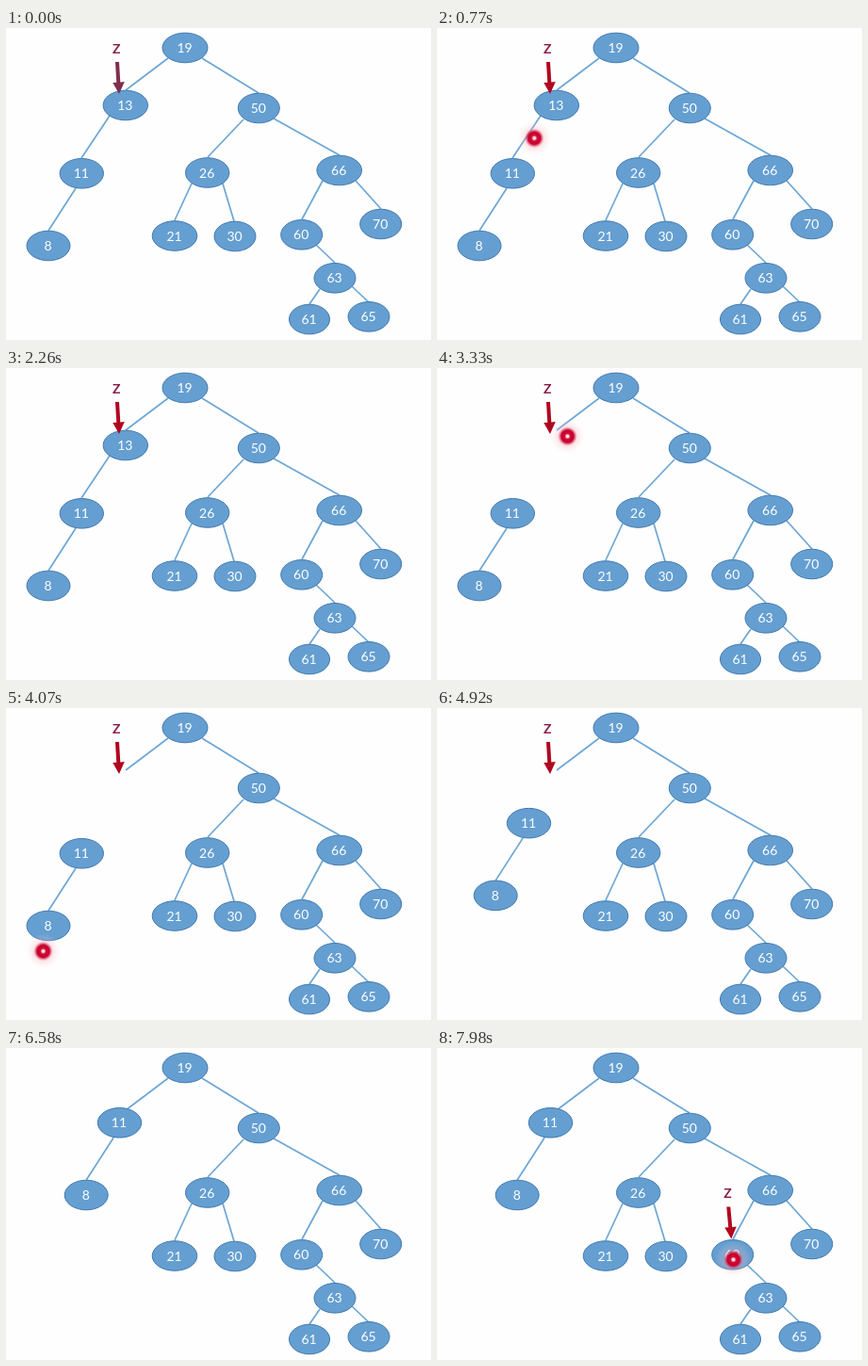
An HTML page that plays this animation: 451 px wide and 331 px high, repeating every 8 s.

```html
<!DOCTYPE html>
<html lang="en">
<head>
<meta charset="utf-8">
<title>Deleting from a binary search tree</title>
<style>
html, body { margin: 0; width: 100%; height: 100%; overflow: hidden; background: #fefefe; }
svg { display: block; width: 451px; height: 331px; }
ellipse { fill: #659fd1; stroke: #4179ae; stroke-width: 1; }
.edge { stroke: #6ca6d5; stroke-width: 1.7; }
.value { font: 14px Lato, Carlito, sans-serif; fill: #fff; text-anchor: middle; }
.letter { font: bold 14px Lato, Carlito, sans-serif; fill: #87204a; text-anchor: middle; }
</style>
</head>
<body>
<svg viewBox="0 0 451 331">
  <defs>
    <radialGradient id="glow">
      <stop offset="0" stop-color="#fff"/>
      <stop offset=".07" stop-color="#fbd5dd"/>
      <stop offset=".16" stop-color="#d60a35"/>
      <stop offset=".34" stop-color="#c4002b"/>
      <stop offset=".43" stop-color="#d83c5c" stop-opacity=".7"/>
      <stop offset=".54" stop-color="#f4a9b5" stop-opacity=".3"/>
      <stop offset="1" stop-color="#ffe4e4" stop-opacity="0"/>
    </radialGradient>
  </defs>
  <g id="tree"></g>
  <g id="removed"></g>
  <g id="subtree"></g>
  <g id="arrowA"></g>
  <g id="arrowB"></g>
  <circle id="laser" r="19" fill="url(#glow)"/>
</svg>
<script>
const LOOP = 8000;
const $ = id => document.getElementById(id);

function add(parent, tag, attrs, text) {
  const el = document.createElementNS("http://www.w3.org/2000/svg", tag);
  for (const k in attrs) el.setAttribute(k, attrs[k]);
  if (text !== undefined) el.textContent = text;
  parent.appendChild(el);
  return el;
}

function edge(g, x1, y1, x2, y2) {
  add(g, "line", { class: "edge", x1, y1, x2, y2 });
}

function node(g, value, cx, cy, rx = 22) {
  add(g, "ellipse", { cx, cy, rx, ry: 15.8 });
  add(g, "text", { class: "value", x: cx - 0.5, y: cy + 5 }, value);
}

// Labelled pointer; x, y is the top of the shaft, lean shifts the tip.
function pointer(g, x, y, lean) {
  add(g, "text", { class: "letter", x: x - 0.7, y: y - 9.5 }, "Z");
  const m = x + lean * 0.65;
  return add(g, "path", {
    d: `M${x - 2} ${y}h4L${m + 2} ${y + 21.5}l4.5 -.5L${x + lean} ${y + 34}L${m - 6} ${y + 22}l4 -.3Z`
  });
}

const tree = $("tree"), removed = $("removed"), subtree = $("subtree");

edge(tree, 172, 32, 127, 66);
edge(tree, 208, 32, 268, 69);
edge(tree, 252, 97, 214, 137);
edge(tree, 284, 96, 354, 135);
edge(tree, 197, 165, 179, 204);
edge(tree, 230, 165, 242, 205);
edge(tree, 336, 162, 314, 203);
edge(tree, 371, 162, 398, 192);
edge(tree, 329, 230, 349, 249);
edge(tree, 333, 277, 322, 293);
edge(tree, 367, 274, 385, 291);

node(tree, 19, 190, 21, 24);
node(tree, 50, 268.3, 85);
node(tree, 26, 213.7, 153.5, 23.2);
node(tree, 66, 353.7, 151, 23.8);
node(tree, 21, 179, 220.5, 23.8);
node(tree, 30, 243, 221);
node(tree, 60, 313.7, 219.3);
node(tree, 70, 397.7, 208);
node(tree, 63, 349, 265.3);
node(tree, 61, 322, 309, 21.5);
node(tree, 65, 385, 306.3);

edge(removed, 110, 93, 80, 138);
node(removed, 13, 126.8, 82, 23.7);

edge(subtree, 74, 170, 45, 215);
node(subtree, 11, 80.3, 154.3, 23.2);
node(subtree, 8, 45, 231, 23);

const shaftA = pointer($("arrowA"), 118, 36, 2);
pointer($("arrowB"), 309.3, 168.5, 3).setAttribute("fill", "#b3061f");

const clamp = v => Math.max(0, Math.min(1, v));
const ramp = (t, a, b) => clamp((t - a) / (b - a));
const smooth = p => p * p * (3 - 2 * p);
const show = (el, o) => el.setAttribute("opacity", o);

// Laser strokes: lists of [time, x, y]; the dot is hidden between them.
const strokes = [
  [[620, 122, 88], [820, 100, 122], [1050, 78, 162], [1380, 33, 237], [1650, 45, 236], [1900, 62, 205]],
  [[2950, 128, 84], [3330, 138.5, 72.5], [3550, 102, 128], [3800, 62, 192], [4070, 39.5, 258], [4260, 42, 250]],
  [[7400, 322, 196], [7650, 312, 217], [7980, 314.5, 224.5], [8000, 314.5, 224.5]]
];

function laserAt(t) {
  const s = strokes.find(k => t >= k[0][0] && t <= k[k.length - 1][0]);
  if (!s) return null;
  const i = Math.max(1, s.findIndex(k => k[0] >= t));
  const [t0, x0, y0] = s[i - 1], [t1, x1, y1] = s[i];
  const p = smooth(ramp(t, t0, t1));
  return [x0 + (x1 - x0) * p, y0 + (y1 - y0) * p];
}

function draw(t) {
  show(removed, 1 - ramp(t, 2300, 2700));

  const p = smooth(ramp(t, 4460, 5480));
  subtree.setAttribute("transform", `translate(${40.2 * p} ${-75 * p})`);

  const r = ramp(t, 0, 500);
  shaftA.setAttribute("fill", `rgb(${128 + 48 * r},${46 - 40 * r},${78 - 46 * r})`);
  show($("arrowA"), 1 - ramp(t, 5850, 6150));
  show($("arrowB"), ramp(t, 6850, 7150));

  const spot = laserAt(t);
  show($("laser"), spot ? 1 : 0);
  if (spot) {
    $("laser").setAttribute("cx", spot[0]);
    $("laser").setAttribute("cy", spot[1]);
  }
}

const start = performance.now();
function tick() {
  draw((performance.now() - start) % LOOP);
  requestAnimationFrame(tick);
}
tick();
</script>
</body>
</html>
```
